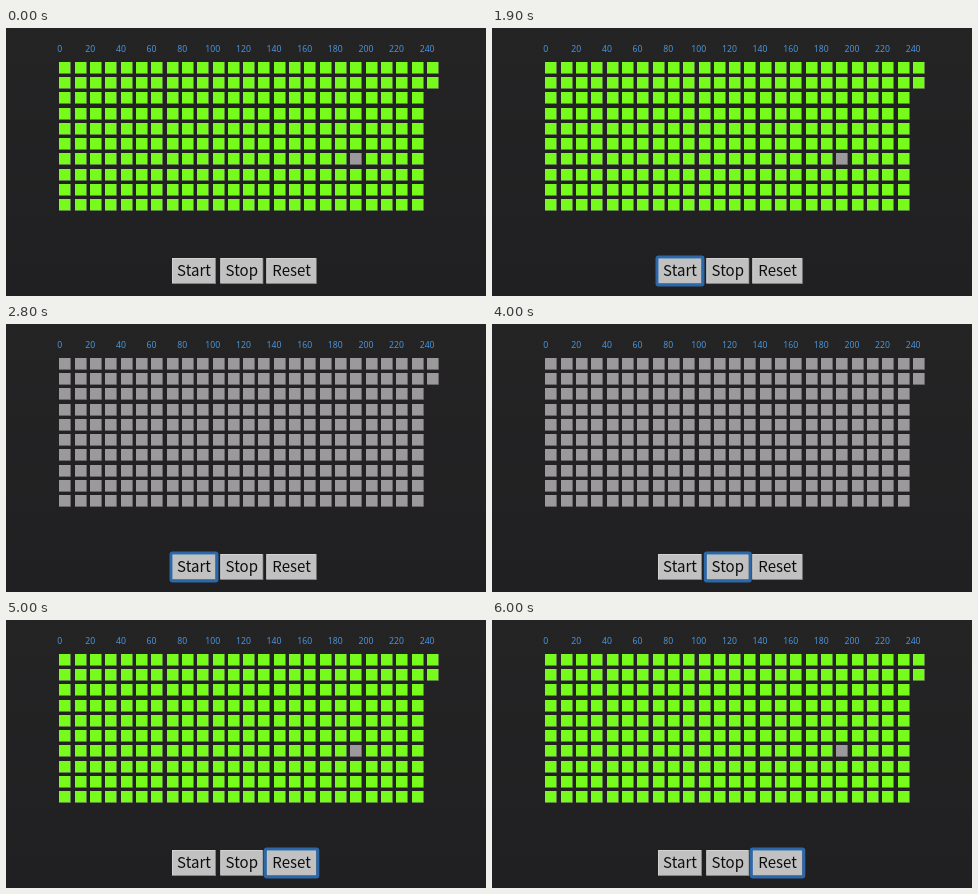
Animation of 480x268 px, one loop 6.1 s. Source, as an HTML page:

```html
<!DOCTYPE html>
<html lang="en">
<head>
<meta charset="utf-8">
<title>Game of Life</title>
<style>
html, body { margin: 0; width: 100%; height: 100%; overflow: hidden; background: #222122; }
svg { display: block; }
text { text-anchor: middle; }
.label { font: 8.7px "Noto Sans", "Open Sans", sans-serif; fill: #4a94da; }
.button { font: 15px "Noto Sans CJK JP", "Noto Sans", sans-serif; fill: #0c0c0c; }
.ring { fill: none; stroke: #2c68a8; stroke-width: 3; }
</style>
</head>
<body>
<svg id="stage" width="480" height="268" viewBox="0 0 480 268">
  <defs>
    <linearGradient id="shade" x2="0" y2="1">
      <stop stop-color="#252425"/>
      <stop offset="1" stop-color="#201f21"/>
    </linearGradient>
  </defs>
  <rect width="480" height="268" fill="url(#shade)"/>
</svg>
<script>
const LOOP = 6100, ROWS = 10, COUNT = 242;
const stage = document.getElementById('stage');

function add(tag, attrs, text = '') {
  const el = document.createElementNS('http://www.w3.org/2000/svg', tag);
  for (const key in attrs) el.setAttribute(key, attrs[key]);
  el.textContent = text;
  stage.append(el);
  return el;
}

// Raised box: dark lower-right edge, light upper-left edge, face on top
function box(x, y, w, h, light, dark, fill) {
  add('rect', { x, y, width: w, height: h, fill: dark });
  add('rect', { x, y, width: w - 1, height: h - 1, fill: light });
  return add('rect', { x: x + 1, y: y + 1, width: w - 2, height: h - 2, fill });
}

const col = i => Math.floor(i / ROWS), row = i => i % ROWS;

// One generation of Conway's rules on the column-wise grid
function step(cells) {
  return cells.map((alive, i) => {
    let n = 0;
    cells.forEach((other, j) => {
      if (j !== i && Math.abs(col(i) - col(j)) < 2 && Math.abs(row(i) - row(j)) < 2) n += other;
    });
    return n === 3 || (alive && n === 2) ? 1 : 0;
  });
}

const full = Array.from({ length: COUNT }, (_, i) => i === 196 ? 0 : 1);
const second = step(full), third = step(second);

for (let n = 0; n <= 240; n += 20)
  add('text', { class: 'label', x: 53.7 + n * 1.531, y: 23.6 }, n);

const faces = full.map((_, i) => {
  const x = Math.round(53.4 + col(i) * 15.31), y = Math.round(33.8 + row(i) * 15.25);
  add('rect', { x, y, width: 12, height: 12, fill: '#555356' });
  return add('rect', { x, y, width: 11.3, height: 11.3 });
});

const rings = [['Start', 166, 44], ['Stop', 214.3, 43], ['Reset', 260.3, 50.5]].map(([name, x, w]) => {
  box(x, 230, w, 26, '#d2d2d2', '#858585', '#c1c1c1');
  add('text', { class: 'button', x: x + w / 2, y: 248.3 }, name);
  return add('rect', { class: 'ring', x: x - 1, y: 229, width: w + 2, height: 28, rx: 1.5 });
});

function draw(now) {
  const t = now % LOOP;
  const cells = t < 2000 || t >= 5000 ? full : t < 2500 ? second : third;
  const focus = t < 1700 ? -1 : t < 4000 ? 0 : t < 4700 ? 1 : 2;
  faces.forEach((face, i) => face.setAttribute('fill', cells[i] ? '#76fb1d' : '#9b999b'));
  rings.forEach((ring, i) => ring.setAttribute('visibility', i === focus ? 'visible' : 'hidden'));
  requestAnimationFrame(draw);
}
draw(performance.now());
</script>
</body>
</html>
```
